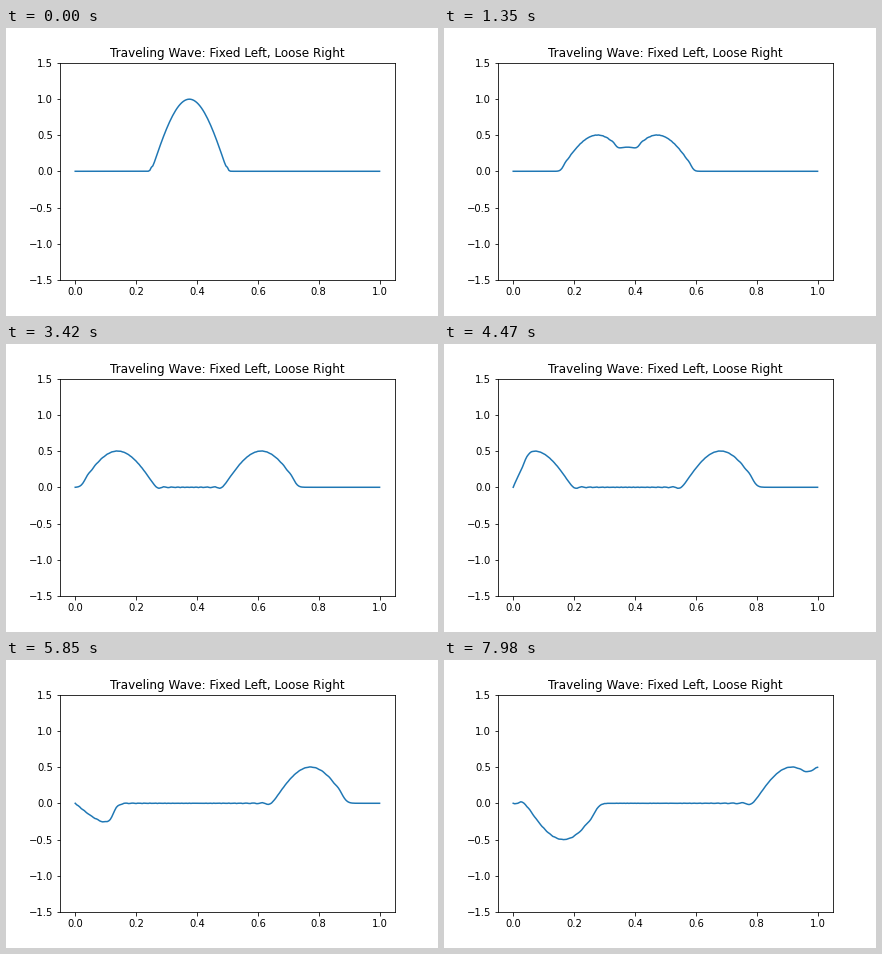
A matplotlib script for the animation above (8 s loop, 432 by 288 pixels).

```python
import numpy as np
import matplotlib.pyplot as plt
from matplotlib.animation import FuncAnimation

FRAMES = 267
LOOP_MS = 8000
CELLS = 200
DT = 0.002
LEAD_STEPS = 4  # steps already taken when the loop begins

x = np.linspace(0, 1, CELLS + 1)
c2 = (DT * CELLS) ** 2  # squared Courant number, wave speed 1


def curvature(u):
    """Second difference with a fixed left end and a free right end."""
    d = np.zeros_like(u)
    d[1:-1] = u[2:] - 2 * u[1:-1] + u[:-2]
    d[-1] = 2 * (u[-2] - u[-1])
    return d


def solve(steps):
    """Leapfrog solution of the wave equation, starting at rest."""
    inside = (x >= 0.25) & (x <= 0.5)
    u = np.where(inside, np.sin(4 * np.pi * (x - 0.25)), 0.0)
    states = [u, u + 0.5 * c2 * curvature(u)]
    while len(states) < steps:
        prev, cur = states[-2:]
        states.append(2 * cur - prev + c2 * curvature(cur))
    return states


waves = solve(FRAMES + LEAD_STEPS)[LEAD_STEPS:]

plt.rcParams["font.family"] = "DejaVu Sans"
fig, ax = plt.subplots(figsize=(6, 4), dpi=72)
fig.subplots_adjust(left=0.125, right=0.9, bottom=0.125, top=0.88)
ax.set_title("Traveling Wave: Fixed Left, Loose Right")
ax.set_xlim(-0.05, 1.05)
ax.set_ylim(-1.5, 1.5)
line, = ax.plot(x, waves[0], color="#1f77b4", lw=1.5)


def draw(i):
    line.set_ydata(waves[i])
    return line,


anim = FuncAnimation(fig, draw, frames=FRAMES, init_func=lambda: draw(0),
                     interval=LOOP_MS / FRAMES, repeat=True, repeat_delay=0)
plt.show()
```
